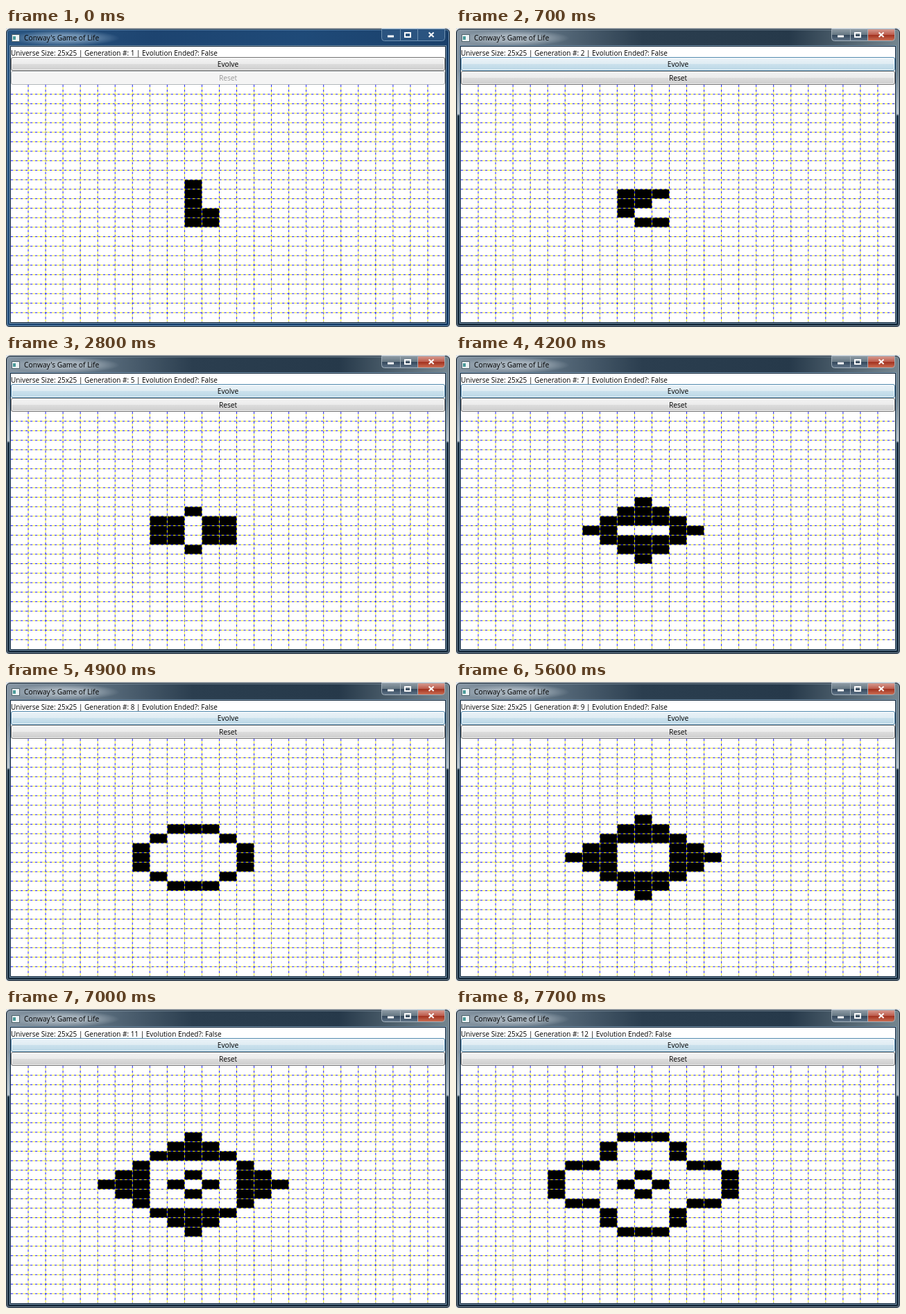
An HTML page with a canvas for the animation above (8000 ms loop, 640 px wide and 432 px high).

```html
<!DOCTYPE html>
<html lang="en">
<head>
<meta charset="utf-8">
<title>Conway's Game of Life</title>
<style>
html, body { margin: 0; width: 100%; height: 100%; overflow: hidden; background: #dfe5eb; }
body { position: relative; font: 10px/14px "Open Sans", "Noto Sans", sans-serif; color: #000; }
div, canvas, svg { position: absolute; box-sizing: border-box; }
#win {
  left: 0; top: 1px; width: 640px; height: 431px; overflow: hidden;
  border: 1px solid #101c28; border-radius: 6px 6px 5px 5px;
  box-shadow: inset 0 0 0 1px #7fa0bd;
  background: linear-gradient(100deg, #2a5682, #1d4470 30%, #1f4a78 60%, #183c65);
}
.active #win {
  box-shadow: inset 0 0 0 1px #8496a5;
  background: linear-gradient(#fff0 60px, #dfe6ebaa 122px, #1b2f41 125px),
    linear-gradient(90deg, #8796a3, #5d7080 20%, #2b3e4f 42%, #26394a 75%, #75868f);
}
#glow {
  left: 4px; top: 3px; width: 160px; height: 23px;
  background: radial-gradient(closest-side, #86a5c2cc 40%, #86a5c200);
}
.active #glow { background: radial-gradient(closest-side, #b4bfc8cc 40%, #b4bfc800); }
#title { left: 26px; top: 7px; font-size: 10.25px; white-space: pre; }
#icon { left: 8px; top: 9px; width: 12px; height: 11px; background: #edf3f5; border: 1px solid #52666e; }
#icon::after { content: ""; position: absolute; left: 1px; top: 2px; width: 4px; height: 5px; background: #4a9a99; }
#client { left: 6px; top: 26px; width: 628px; height: 400px; border: 1px solid #14273a; background: #fff; box-shadow: 0 0 0 1px #7895ad; }
#status { left: 7px; top: 29px; white-space: pre; }
.btn {
  left: 7px; width: 626px; height: 20px; line-height: 19px; text-align: center; font-size: 10.2px;
  border: 1px solid #707070; border-radius: 3px; box-shadow: inset 0 0 0 1px #fffc;
  background: linear-gradient(#f3f3f3, #ebebeb 50%, #ddd 50%, #cdcdcd);
}
#evolve { top: 42px; }
#reset { top: 62px; color: #969696; border-color: #adb2b5; background: #f4f4f4; }
.active #evolve { border-color: #4f88ad; background: linear-gradient(#ebf3f8, #dfecf3 50%, #cbe1ed 50%, #bbd7e5); }
.active #reset { color: #000; border-color: #707070; background: linear-gradient(#f3f3f3, #ebebeb 50%, #ddd 50%, #cdcdcd); }
#controls { left: 540px; top: 1px; }
#controls .box { fill: #2b5480; stroke: #6f91b0; }
.active #controls .box { fill: url(#steel); stroke: #a3b0ba; }
.active #controls .close { fill: url(#red); }
#grid { left: 7px; top: 82px; }
</style>
</head>
<body>
<div id="win"></div>
<div id="glow"></div>
<div id="icon"></div>
<div id="title">Conway's Game of Life</div>
<svg id="controls" width="94" height="19">
  <defs>
    <linearGradient id="steel" x2="0" y2="1">
      <stop stop-color="#8f9ca6"/><stop offset=".48" stop-color="#667783"/>
      <stop offset=".5" stop-color="#32465a"/><stop offset="1" stop-color="#62768a"/>
    </linearGradient>
    <linearGradient id="red" x2="0" y2="1">
      <stop stop-color="#d79d93"/><stop offset=".48" stop-color="#bd5c4c"/>
      <stop offset=".5" stop-color="#a02f1d"/><stop offset="1" stop-color="#cd7156"/>
    </linearGradient>
  </defs>
  <path class="box" d="M1.5 .5H28.5V17.5H5.5Q1.5 17.5 1.5 13.5Z"/>
  <path class="box" d="M28.5 .5H53.5V17.5H28.5Z"/>
  <path class="box close" d="M53.5 .5H92.5V13.5Q92.5 17.5 88.5 17.5H53.5Z"/>
  <g fill="none" stroke="#fff">
    <path d="M10 11H19" stroke-width="3"/>
    <path d="M35 6H43V12H35Z" stroke-width="2"/>
    <path d="M69.5 5.5L76.5 12M76.5 5.5L69.5 12" stroke-width="2"/>
  </g>
</svg>
<div id="client"></div>
<div id="status"></div>
<div id="evolve" class="btn">Evolve</div>
<div id="reset" class="btn">Reset</div>
<canvas id="grid" width="626" height="343"></canvas>
<script>
const SIZE = 25, STEP = 700, LOOP = 8000;
const SCALE = 0.873, DASH = 4 * SCALE; // the window is shown slightly reduced
const canvas = document.getElementById('grid');
const status = document.getElementById('status');
const ctx = canvas.getContext('2d');
const cellW = canvas.width / SIZE, cellH = canvas.height / SIZE;

function evolve(cells) {
  const alive = (x, y) => x >= 0 && x < SIZE && y >= 0 && y < SIZE ? cells[y * SIZE + x] : 0;
  return cells.map((cell, i) => {
    const x = i % SIZE, y = Math.floor(i / SIZE);
    let count = -cell;
    for (let dy = -1; dy <= 1; dy++)
      for (let dx = -1; dx <= 1; dx++) count += alive(x + dx, y + dy);
    return count === 3 || (cell && count === 2) ? 1 : 0;
  });
}

const seed = Array(SIZE * SIZE).fill(0);
for (const [x, y] of [[10, 10], [10, 11], [10, 12], [10, 13], [10, 14], [11, 13], [11, 14]])
  seed[y * SIZE + x] = 1;
const history = [seed];
while (history.length < Math.ceil(LOOP / STEP)) history.push(evolve(history.at(-1)));

function strokeGrid(color, offset) {
  ctx.strokeStyle = color;
  ctx.lineWidth = SCALE;
  ctx.setLineDash([DASH, DASH]);
  ctx.lineDashOffset = offset;
  ctx.beginPath();
  for (let i = 1; i < SIZE; i++) {
    ctx.moveTo(i * cellW, 0);
    ctx.lineTo(i * cellW, canvas.height);
    ctx.moveTo(0, i * cellH);
    ctx.lineTo(canvas.width, i * cellH);
  }
  ctx.stroke();
}

function draw(index) {
  document.body.className = index ? 'active' : '';
  status.textContent =
    `Universe Size: 25x25 | Generation #: ${index + 1} | Evolution Ended?: False`;
  ctx.fillStyle = '#fff';
  ctx.fillRect(0, 0, canvas.width, canvas.height);
  ctx.fillStyle = '#000';
  history[index].forEach((cell, i) => {
    if (cell) ctx.fillRect(i % SIZE * cellW, Math.floor(i / SIZE) * cellH, cellW, cellH);
  });
  strokeGrid('#00f', 0);
  strokeGrid('#ff0', DASH);
}

let shown = -1;
const start = performance.now();
function tick() {
  const index = Math.floor((performance.now() - start) % LOOP / STEP);
  if (index !== shown) draw(shown = index);
  requestAnimationFrame(tick);
}
tick();
</script>
</body>
</html>
```
